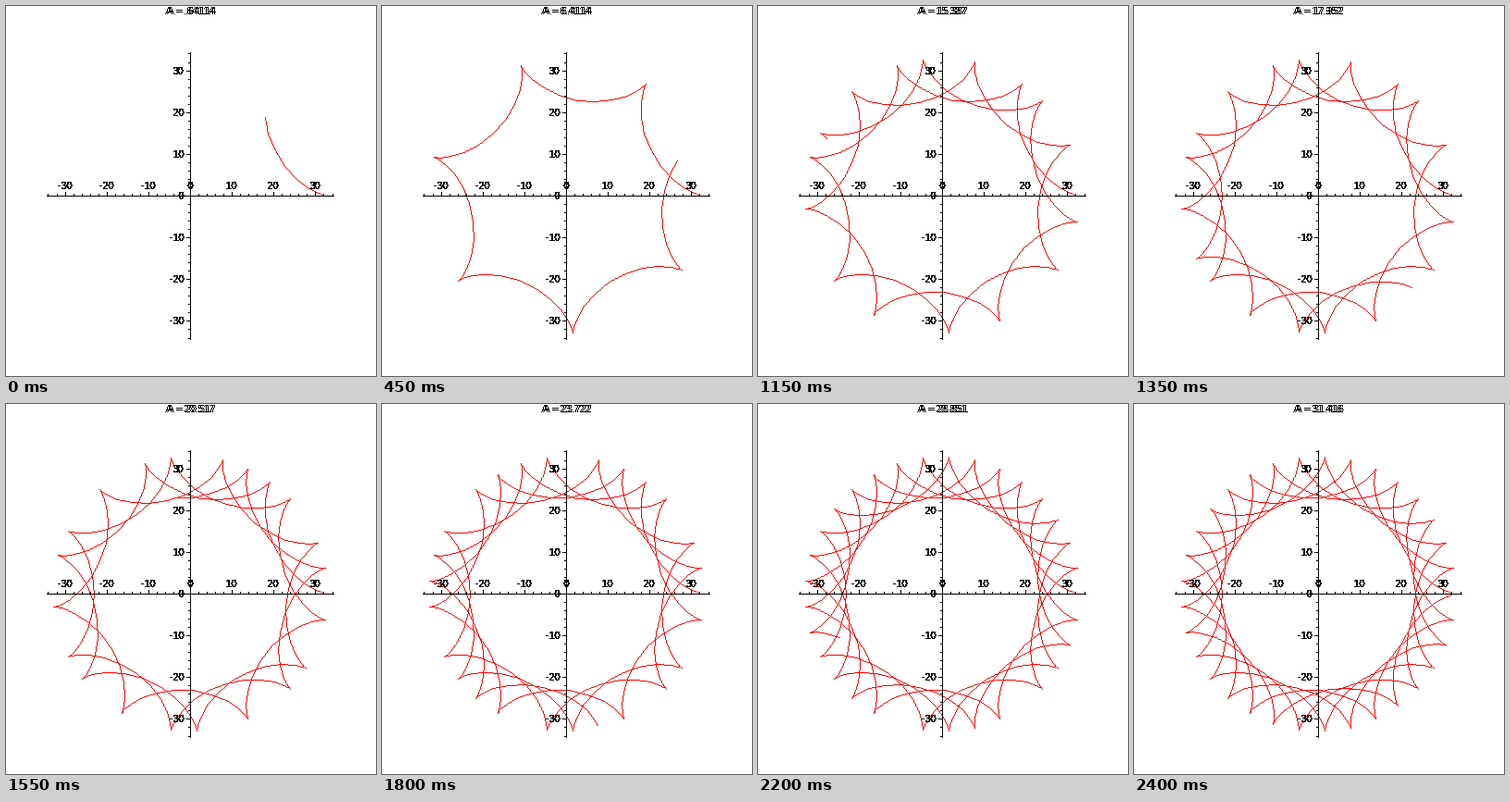
Write a matplotlib script that moves like this. It is 400x400 px and loops after 2.45 s.

```python
import matplotlib.pyplot as plt
import numpy as np
from matplotlib.animation import FuncAnimation
from matplotlib.colors import ListedColormap
from matplotlib.patches import Rectangle

SIZE, DPI = 400, 100
FRAMES, INTERVAL = 49, 50
T_END = 10 * np.pi
STEPS = 8                       # curve segments added per frame
BIG, SMALL = 33, 5              # radii of the fixed and the rolling circle
CX, CY, UNIT = 199.5, 205.5, 4.515
REACH = 34                      # last tick on each axis
PX = 72 / DPI                   # one pixel in points

plt.rcParams["text.hinting"] = "native"
plt.rcParams["text.hinting_factor"] = 1

fig = plt.figure(figsize=(SIZE / DPI, SIZE / DPI), dpi=DPI, facecolor="white")
ax = fig.add_axes([0, 0, 1, 1])
ax.axis("off")


def to_pixel(x, y):
    col = np.floor(CX + UNIT * np.asarray(x)).astype(int)
    row = np.floor(CY - UNIT * np.asarray(y)).astype(int)
    return col, row


def hypocycloid(t):
    arm = BIG - SMALL
    x = arm * np.cos(t) + SMALL * np.cos(arm / SMALL * t)
    y = arm * np.sin(t) - SMALL * np.sin(arm / SMALL * t)
    return x, y


def trace(t):
    """Mask of the curve as a hard-edged line one pixel wide."""
    mask = np.zeros((SIZE, SIZE))
    cols, rows = to_pixel(*hypocycloid(t))
    for x0, y0, x1, y1 in zip(cols, rows, cols[1:], rows[1:]):
        n = max(abs(x1 - x0), abs(y1 - y0)) + 1
        xs = np.rint(np.linspace(x0, x1, n)).astype(int)
        ys = np.rint(np.linspace(y0, y1, n)).astype(int)
        mask[ys, xs] = 1
    return mask


def bar(x, y, w, h):
    ax.add_patch(Rectangle((x, y), w, h, fc="black", lw=0,
                           antialiased=False, zorder=3))


def label(x, y, text, ha="center"):
    """Text struck twice, one pixel apart."""
    return [ax.text(x + dx, y, text, ha=ha, va="baseline", color="black",
                    family="Liberation Sans", size=10.8 * PX,
                    antialiased=False, zorder=4)
            for dx in (-1, 0)]


def draw_axes():
    ox, oy = to_pixel(0, 0)
    left, top = to_pixel(-REACH, REACH)
    right, bottom = to_pixel(REACH, -REACH)
    bar(left - 1, oy, right - left + 3, 1)
    bar(ox, top - 1, 1, bottom - top + 3)
    for v in range(-REACH, REACH + 1, 2):
        major = v % 10 == 0
        length = 5 if major else 3
        x, y = to_pixel(v, v)
        bar(x, oy - length + 1, 1, length)
        bar(ox - length + 1, y, length, 1)
        if major:
            label(x + 0.5, 198, str(v))
            label(193, y + 4, str(v), ha="right")


curve = ax.imshow(np.zeros((SIZE, SIZE)), cmap=ListedColormap(["white", "red"]),
                  vmin=0, vmax=1, extent=(0, SIZE, SIZE, 0), aspect="auto",
                  interpolation="nearest", zorder=1)
draw_axes()
title = label(200, 9, "")
ax.set_xlim(0, SIZE)
ax.set_ylim(SIZE, 0)


def update(i):
    end = T_END * (i + 1) / FRAMES
    curve.set_data(trace(np.linspace(0, end, STEPS * (i + 1) + 1)))
    number = f"{end:#.5g}".lstrip("0")
    for part in title:
        part.set_text(f"A = {number}")
    return [curve, *title]


anim = FuncAnimation(fig, update, frames=FRAMES, interval=INTERVAL,
                     repeat=True, repeat_delay=0, blit=False)
plt.show()
```
